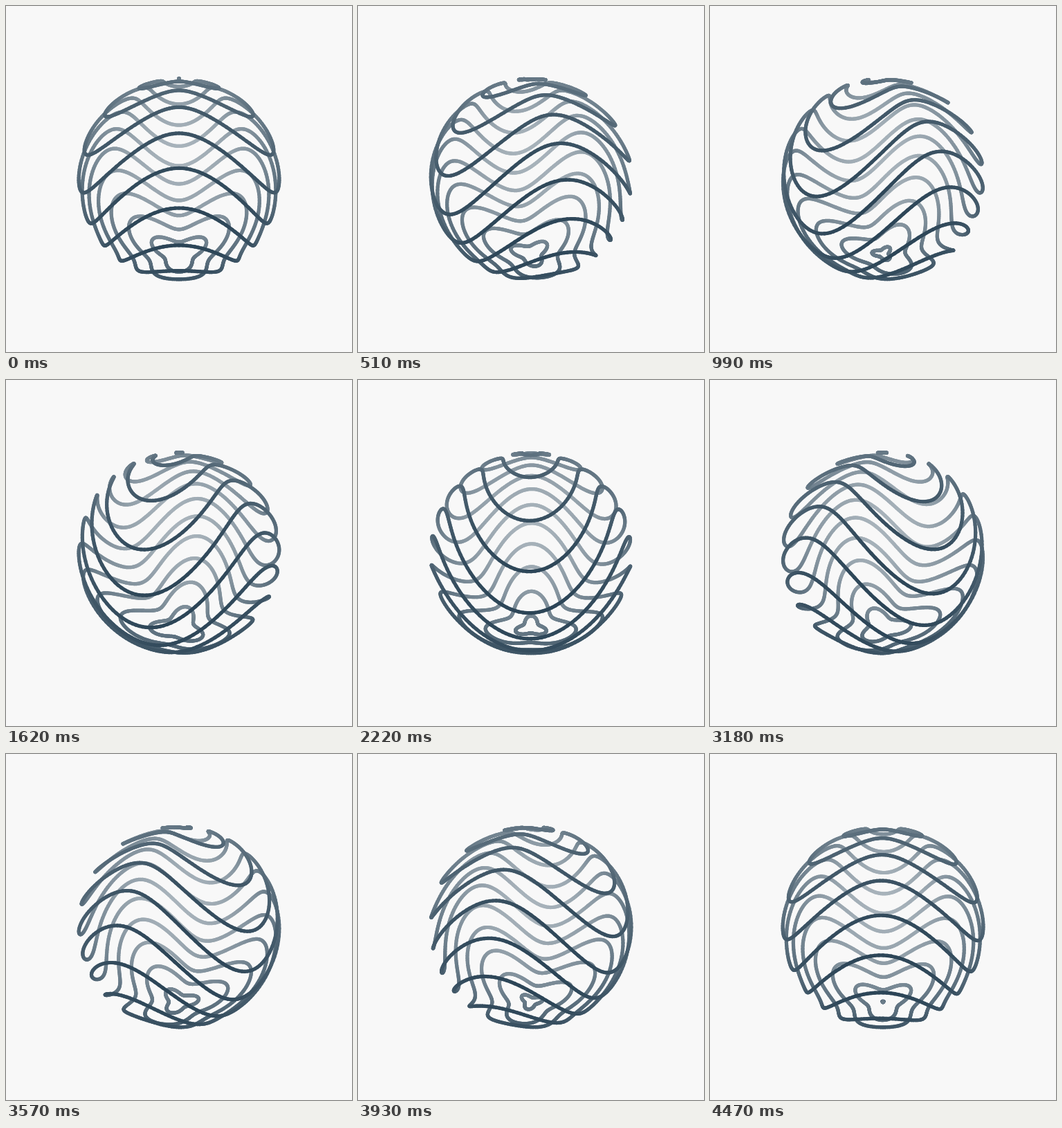
Write an HTML page with a canvas that moves like this. It is 500 by 500 pixels and loops after 4500 ms.

```html
<!DOCTYPE html>
<html>
<head>
<meta charset="utf-8">
<style>
html, body { margin: 0; height: 100%; overflow: hidden; background: #f8f8f8; }
canvas { display: block; }
</style>
</head>
<body>
<canvas id="stage" width="500" height="500"></canvas>
<script>
const ctx = document.getElementById('stage').getContext('2d');
const LOOP = 4500, RINGS = 11, STEPS = 220;
const SCALE = 133.9, NEARNESS = 0.382, TILT = Math.PI / 8, WAVE = 0.34;
const BACK = [168, 179, 187], FRONT = [44, 69, 87];
const sinT = Math.sin(TILT), cosT = Math.cos(TILT);

// Polar angle and longitude to screen position; z points at the viewer,
// out is the depth before tilting and sets the colour
function project(polar, lon) {
  const axis = Math.cos(polar), out = Math.sin(polar) * Math.cos(lon);
  const z = axis * sinT + out * cosT;
  const k = SCALE / (1 - NEARNESS * z);
  return {
    x: 250 + k * Math.sin(polar) * Math.sin(lon),
    y: 250 - k * (axis * cosT - out * sinT),
    z, out
  };
}

function shade(depth) {
  const f = (depth + 1) / 2;
  return `rgb(${BACK.map((c, i) => Math.round(c + (FRONT[i] - c) * f))})`;
}

// The wave scales the stereographic radius, so it keeps its shape towards the poles
function ringPoint(base, step, spin) {
  const lon = step / STEPS * 2 * Math.PI;
  const radius = Math.tan(base / 2) * Math.exp(-WAVE * Math.cos(3 * (lon - spin)));
  return project(2 * Math.atan(radius), lon);
}

function draw(t) {
  const spin = t * 2 * Math.PI / 3;
  const segments = [];
  for (let i = 0; i < RINGS; i++) {
    const base = Math.max(0.002, (i + t * 3 % 1) / RINGS * Math.PI);
    let a = ringPoint(base, 0, spin);
    for (let s = 1; s <= STEPS; s++) {
      const b = ringPoint(base, s, spin);
      segments.push({ a, b, z: a.z + b.z });
      a = b;
    }
  }
  segments.sort((p, q) => p.z - q.z);

  ctx.fillStyle = '#f8f8f8';
  ctx.fillRect(0, 0, 500, 500);
  ctx.lineWidth = 5.2;
  ctx.lineCap = 'round';
  for (const { a, b } of segments) {
    ctx.strokeStyle = shade((a.out + b.out) / 2);
    ctx.beginPath();
    ctx.moveTo(a.x, a.y);
    ctx.lineTo(b.x, b.y);
    ctx.stroke();
  }
}

const start = performance.now();
function tick() {
  draw((performance.now() - start) % LOOP / LOOP);
  requestAnimationFrame(tick);
}
tick();
</script>
</body>
</html>
```
